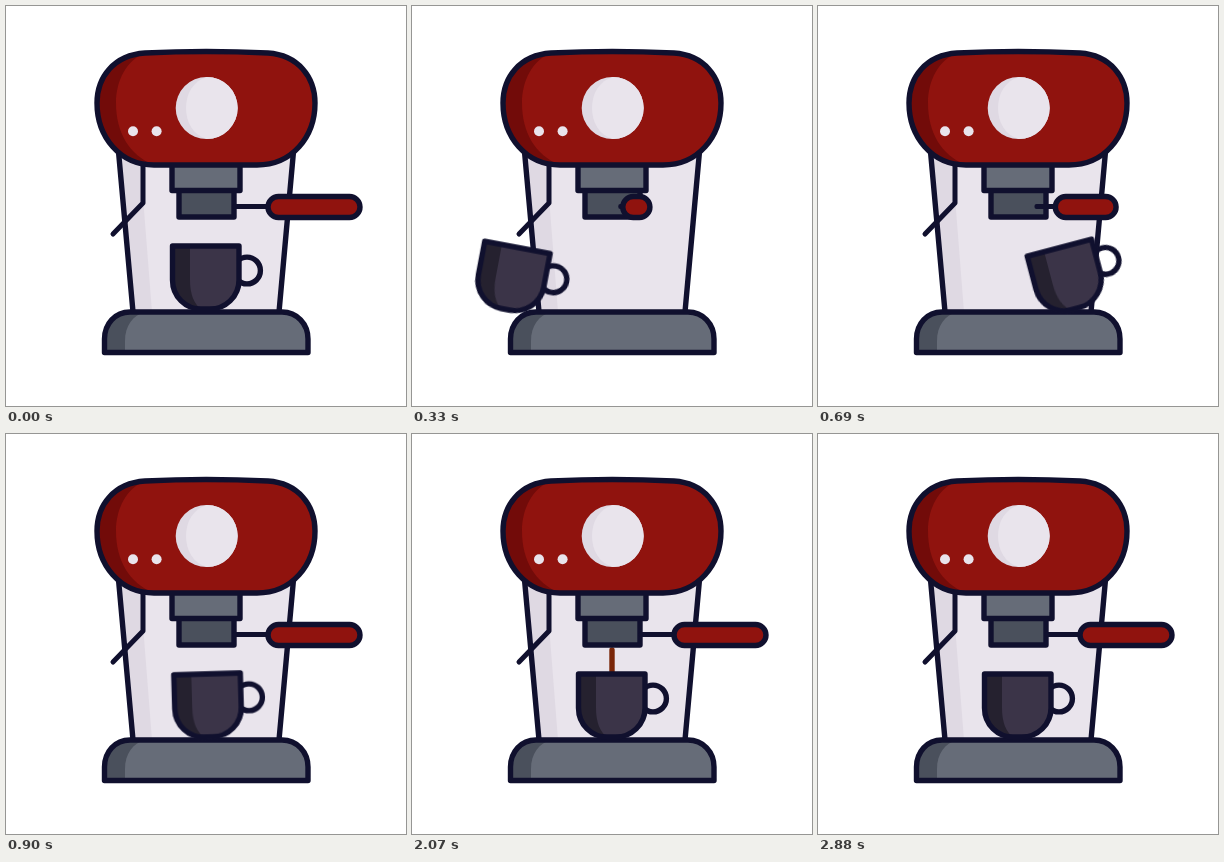
An HTML page without scripts for the animation above (3.27 s loop, 400 px wide and 400 px high).

```html
<!DOCTYPE html>
<html lang="en">
<head>
<meta charset="utf-8">
<title>Espresso machine</title>
<style>
  html, body { margin: 0; width: 100%; height: 100%; overflow: hidden; background: #fff; }
  svg { display: block; width: 100vw; height: 100vh; }

  .line { stroke: #10102e; stroke-width: 5.4; stroke-linejoin: round; stroke-linecap: round; }
  .hollow { fill: none; }
  .cream { fill: #e9e4ec; }
  .cream-shade { fill: #dfd9e3; }
  .red { fill: #90130e; }
  .red-shade { fill: #720b09; }
  .steel { fill: #666c78; }
  .steel-shade { fill: #4a505c; }
  .mug { fill: #3b3448; }
  .mug-shade { fill: #25212f; }

  .slide, .tilt, .grip, .rod, .stream { animation: 3270ms linear infinite; }
  .slide { animation-name: slide; }
  .tilt { animation-name: tilt; transform-origin: 198px 305px; }
  .grip { animation-name: grip; y: 190.5px; height: 21px; rx: 10.5px; }
  .rod { animation-name: rod; y: 198px; height: 5px; rx: 2px; fill: #10102e; }
  .stream {
    animation-name: pour;
    fill: none; stroke: #7a2608; stroke-width: 5.4; stroke-linecap: round;
    stroke-dasharray: 45 200;
  }

  /* The cup leaves to the left and comes back from the right. */
  @keyframes slide {
    0% { transform: translateX(0); animation-timing-function: cubic-bezier(.333, 0, .667, 0); }
    15.28% { transform: translateX(-366px); animation-timing-function: step-end; }
    15.29% { transform: translateX(366px); animation-timing-function: cubic-bezier(.165, .84, .44, 1); }
    30.58%, 100% { transform: translateX(0); }
  }
  @keyframes tilt {
    0% { transform: rotate(0deg); animation-timing-function: cubic-bezier(.333, 0, .667, .15); }
    15.28% { transform: rotate(30deg); animation-timing-function: step-end; }
    15.29% { transform: rotate(-36deg); animation-timing-function: cubic-bezier(.333, .6, .667, 1); }
    30.58%, 100% { transform: rotate(0deg); }
  }

  /* The handle swings towards the viewer and back. */
  @keyframes grip {
    0%, 26.91%, 100% { x: 262px; width: 92px; animation-timing-function: ease-in-out; }
    12.23%, 14.68% { x: 207.5px; width: 23px; animation-timing-function: ease-in-out; }
  }
  @keyframes rod {
    0%, 26.91%, 100% { x: 226px; width: 36px; animation-timing-function: ease-in-out; }
    12.23%, 14.68% { x: 205px; width: 12px; animation-timing-function: ease-in-out; }
  }

  @keyframes pour {
    0%, 31.18% { stroke-dashoffset: 60; }
    31.19% { stroke-dashoffset: 40; }
    44.04% { stroke-dashoffset: 8; }
    44.05%, 62.38% { stroke-dashoffset: 0; }
    62.39% { stroke-dashoffset: -10; }
    88.07% { stroke-dashoffset: -38; }
    88.08%, 100% { stroke-dashoffset: -60; }
  }
</style>
</head>
<body>
<svg viewBox="0 0 400 400">
  <defs>
    <path id="head" d="M139 47Q200 44 262 47C292 49 309 71 309 97C309 131 286 159 251 159H148C114 159 91 131 91 97C91 71 108 49 139 47Z"/>
    <path id="base" d="M98.5 346.5V333C98.5 318 109 306 124 306H276C291 306 302 318 302 333V346.5Z"/>
    <path id="mug" d="M166.5 240H233V274C233 291 219 303 204 303H195C180 303 166.5 291 166.5 274Z"/>
  </defs>

  <path class="cream" d="M112 140H288L273 306H127Z"/>
  <path class="cream-shade" d="M112 140H133L146 306H127Z"/>
  <path class="line hollow" d="M112 140L127 306M288 140L273 306"/>
  <path class="line hollow" d="M137 155V197L107 228" style="stroke-width:5"/>

  <path class="stream" d="M200 205V250"/>
  <rect class="line steel-shade" x="173" y="184" width="55" height="27"/>
  <rect class="line steel" x="166" y="158" width="68" height="26.5"/>

  <use href="#head" class="red"/>
  <path class="red-shade" d="M139 47C121 54 110 74 110 97C110 126 123 149 148 159C114 159 91 131 91 97C91 71 108 49 139 47Z"/>
  <use href="#head" class="line hollow"/>
  <circle class="cream-shade" cx="200.7" cy="102" r="31"/>
  <path class="cream" d="M200.7 71A31 31 0 0 1 200.7 133C187 129 180 116 180 102C180 88 187 75 200.7 71Z"/>
  <circle class="cream" cx="127" cy="125.3" r="5"/>
  <circle class="cream" cx="150.6" cy="125.3" r="5"/>

  <use href="#base" class="steel"/>
  <path class="steel-shade" d="M98.5 346.5V333C98.5 318 109 306 124 306H139C127 309 119 320 119 335V346.5Z"/>
  <use href="#base" class="line hollow"/>

  <rect class="rod"/>
  <rect class="grip line red"/>

  <g class="slide">
    <g class="tilt">
      <circle class="line hollow" cx="241" cy="264.5" r="13.4"/>
      <use href="#mug" class="mug"/>
      <path class="mug-shade" d="M166.5 240H184V274C184 288 188 298 195 303C180 303 166.5 291 166.5 274Z"/>
      <use href="#mug" class="line hollow"/>
    </g>
  </g>
</svg>
</body>
</html>
```
